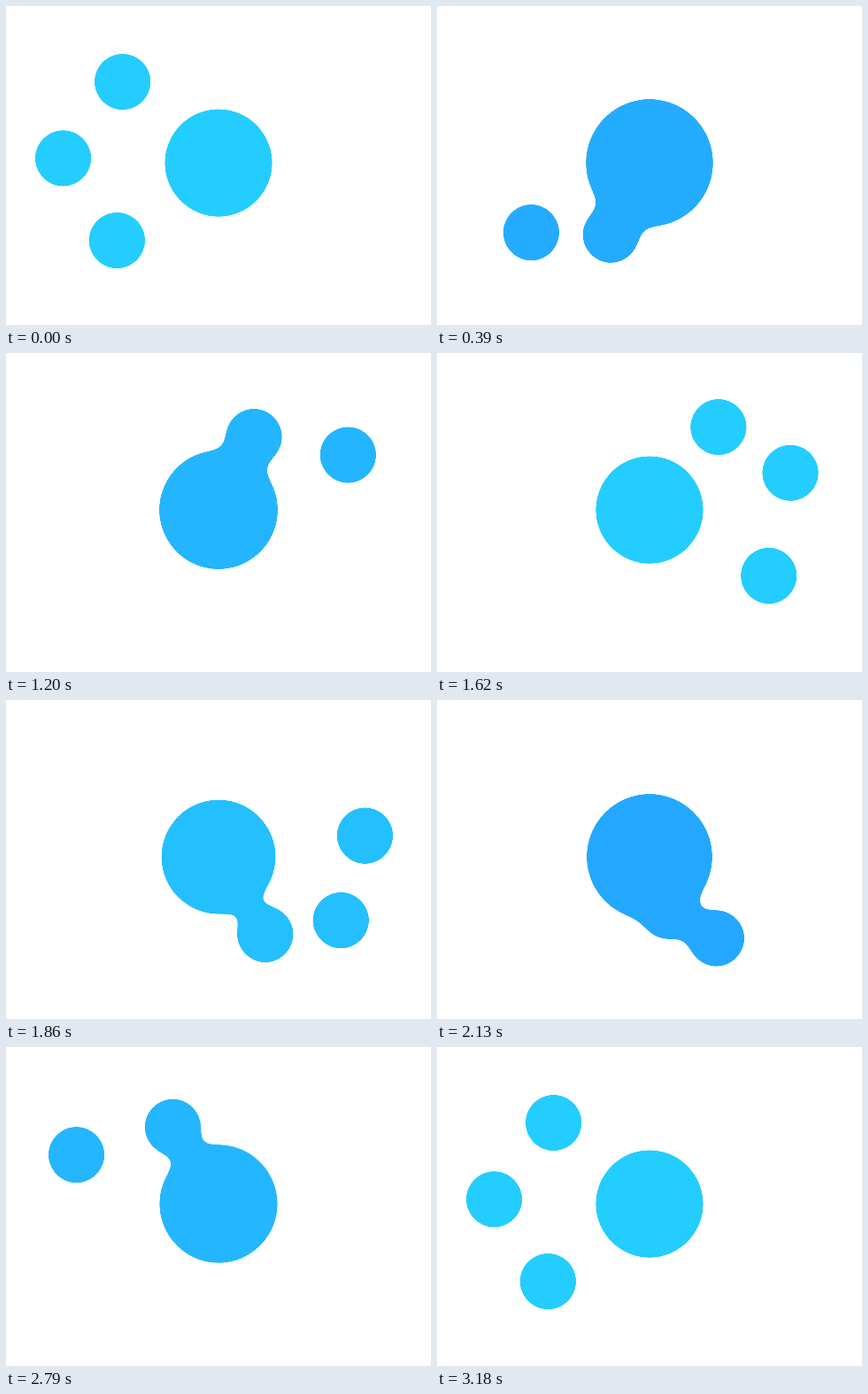
An HTML page that plays this animation: 480 by 360 pixels, repeating every 3.21 s.

```html
<!DOCTYPE html>
<html>
<head>
<meta charset="utf-8">
<style>
html, body { margin: 0; width: 100%; height: 100%; overflow: hidden; background: #fff; }
svg { display: block; }
</style>
</head>
<body>
<svg width="480" height="360" viewBox="0 0 480 360">
  <filter id="goo" filterUnits="userSpaceOnUse" x="0" y="0" width="480" height="360" color-interpolation-filters="sRGB">
    <feGaussianBlur stdDeviation="10"/>
    <feComponentTransfer><feFuncA type="linear" slope="50" intercept="-24.5"/></feComponentTransfer>
  </filter>
  <path id="track" fill="none" d="M240 177
    C230 115 200 83 154 83 C100 83 64.5 124 64.5 174
    C64.5 226 100 268.5 152 268.5 C202 268.5 232 240 240 177
    C250 110 278 83.5 320 83.5 C372 83.5 408.5 128 408.5 178
    C408.5 236 368 269 318 269 C282 269 250 244 240 177"/>
  <g id="blob" filter="url(#goo)"><circle cx="240" cy="177"/></g>
</svg>
<script>
const LOOP = 3210, STEP = 30, PERIOD = LOOP - STEP, SIGMA = 10;
const track = document.getElementById('track');
const blob = document.getElementById('blob');
const core = blob.firstElementChild;
const total = track.getTotalLength();
const samples = Array.from({ length: Math.ceil(total) }, (_, i) => track.getPointAtLength(i));

// Periodic monotone cubic through [time, value]; each period adds gain.
function curve(keys, gain = 0) {
  const n = keys.length;
  const key = i => {
    const turn = Math.floor(i / n), [t, v] = keys[i - turn * n];
    return [t + turn * PERIOD, v + turn * gain];
  };
  const secant = i => {
    const [t0, v0] = key(i), [t1, v1] = key(i + 1);
    return (v1 - v0) / (t1 - t0);
  };
  const slope = i => {
    const a = secant(i - 1), b = secant(i);
    return a * b > 0 ? 2 * a * b / (a + b) : 0;
  };
  return t => {
    let i = n - 1;
    while (keys[i][0] > t) i--;
    const [t0, v0] = key(i), [t1, v1] = key(i + 1);
    const d = t1 - t0, u = (t - t0) / d, w = 1 - u;
    return v0 * w * w * (1 + 2 * u) + v1 * u * u * (3 - 2 * u)
      + d * u * w * (slope(i) * w - slope(i + 1) * u);
  };
}

// Distance along the track of the sample nearest to a point.
function distance(x, y) {
  let best = 0, least = Infinity;
  samples.forEach((p, i) => {
    const d = Math.hypot(p.x - x, p.y - y);
    if (d < least) { least = d; best = i; }
  });
  return best;
}

// Blurring shrinks a circle by about sigma² / 2r, so draw it larger.
const setRadius = (circle, r) => circle.setAttribute('r', r + SIGMA * SIGMA / (2 * r));

function makeBall(stops) {
  let last = 0;
  const keys = stops.map(([t, x, y]) => {
    let s = distance(x, y);
    if (s < last) s += total;
    last = s;
    return [t, s];
  });
  const circle = blob.appendChild(core.cloneNode());
  setRadius(circle, 31.5);
  const travel = curve(keys, total);
  return t => {
    const p = track.getPointAtLength(travel(t) % total);
    circle.setAttribute('cx', p.x);
    circle.setAttribute('cy', p.y);
  };
}

const balls = [
  [[0, 126, 263.5], [1080, 354.5, 91], [1200, 387.5, 114.5], [1620, 375, 251.5],
   [2700, 102.5, 98], [2790, 78.5, 121]],
  [[0, 65, 171.5], [390, 196, 257], [1200, 280, 94], [1620, 399.5, 135],
   [2130, 258, 240], [2790, 188.5, 91]],
  [[0, 131.5, 84.5], [390, 107, 255], [540, 181.5, 263.5], [1200, 246, 148],
   [1620, 317.5, 83.5], [2130, 315, 268.5], [2160, 296.5, 265.5], [2790, 234, 152]]
].map(makeBall);

const radius = curve([[0, 60.5], [390, 71.7], [750, 74], [1080, 69.7], [1200, 66.8],
  [1620, 60.5], [2130, 70.8], [2370, 73.5], [2700, 68.2], [2790, 66.5]]);
const green = curve([[0, 205], [390, 172], [770, 158], [1200, 181],
  [1620, 205], [2130, 168], [2380, 160], [2790, 182]]);

function draw() {
  const t = Math.floor(performance.now() % LOOP / STEP) * STEP % PERIOD;
  setRadius(core, radius(t));
  blob.setAttribute('fill', `rgb(36,${Math.round(green(t))},255)`);
  balls.forEach(move => move(t));
  requestAnimationFrame(draw);
}
draw();
</script>
</body>
</html>
```
